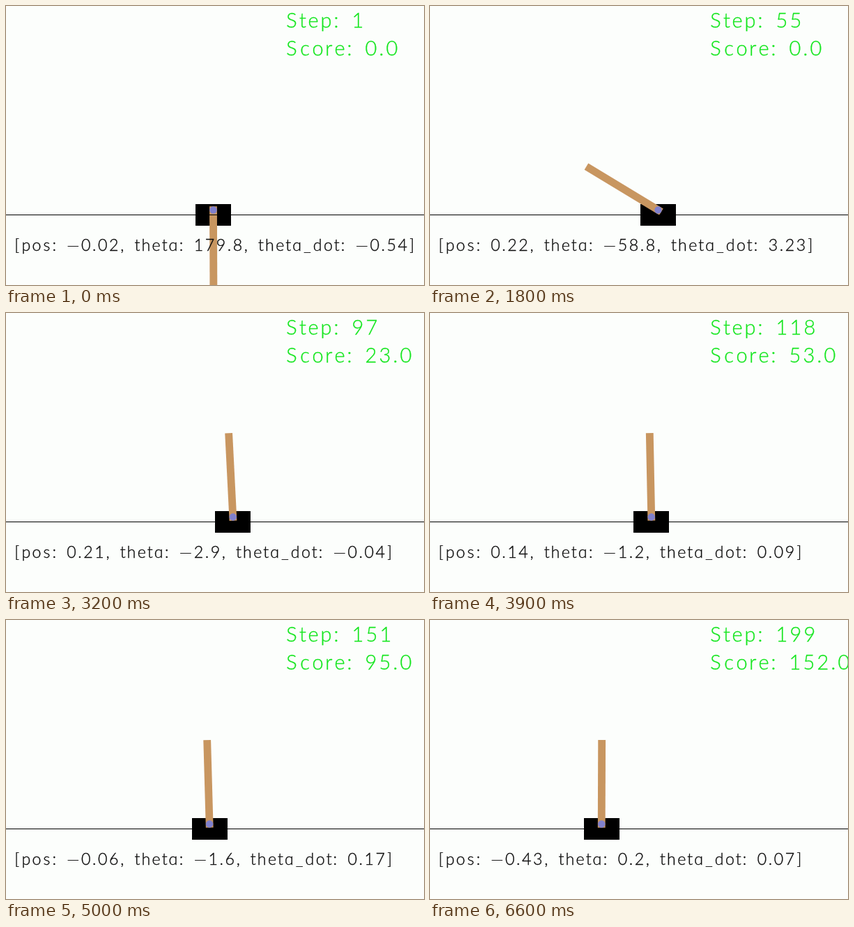
An HTML page with a canvas for the animation above (6700 ms loop, 600 by 400 pixels).

```html
<!DOCTYPE html>
<html lang="en">
<head>
<meta charset="utf-8">
<title>Cart pole swing-up</title>
<style>
  html, body { margin: 0; width: 100%; height: 100%; overflow: hidden; background: #fcfefc; }
  canvas { display: block; }
</style>
</head>
<body>
<canvas id="stage" width="600" height="400"></canvas>
<script>
const ctx = document.getElementById('stage').getContext('2d');
const FRAME_MS = 100, FRAMES = 67, STEPS_PER_FRAME = 3;
const RAD = Math.PI / 180, FRAME_SECONDS = 0.06;
const PX_PER_UNIT = 125, AXLE_Y = 292.5;
const GREEN = '#14e61e', INK = '#0c0c0c';

// Key states of the swing-up: frame, cart position, pole degrees, pole rad/s
const KEYS = [
  [0, -0.02, 179.8, -0.54],
  [4, -0.35, 157, -2.3],
  [7, -0.7, 137, -0.3],
  [9, -0.75, 144.8, 2.89],
  [14, -0.18, 234, 5.8],
  [18, 0.22, 301.2, 3.23],
  [23, 0.27, 338, 1.3],
  [32, 0.206, 357.1, -0.04],
  [45, 0.06, 358.1, -0.23],
  [56, -0.23, 360.9, -0.06],
  [66, -0.43, 360.2, 0.07]
].map(([frame, pos, deg, spin]) => ({ frame, pos, deg, turn: spin * FRAME_SECONDS / RAD }));

// Cart speed at each key follows from its neighbours
KEYS.forEach((k, i) => {
  const a = KEYS[i - 1] || k, b = KEYS[i + 1] || k;
  k.speed = (b.pos - a.pos) / (b.frame - a.frame);
});

// Cubic Hermite curve through a value and its slope
function curve(a, b, value, slope, frame) {
  const h = b.frame - a.frame, u = (frame - a.frame) / h;
  const d = b[value] - a[value], m = a[slope] * h, n = b[slope] * h;
  const c2 = 3 * d - 2 * m - n, c3 = m + n - 2 * d;
  return {
    value: a[value] + u * (m + u * (c2 + u * c3)),
    slope: (m + u * (2 * c2 + u * 3 * c3)) / h
  };
}

// One point per step once upright, ten on a bonus step
const UPRIGHT_STEP = 74, BONUS_STEPS = [117, 148, 159];
function scoreAt(step) {
  const bonuses = BONUS_STEPS.filter(s => step >= s).length;
  return Math.max(0, step - UPRIGHT_STEP) + 9 * bonuses;
}

// Character advances, relative to a capital height of 21
const ADVANCE = {};
const setAdvance = (chars, w) => { for (const c of chars) ADVANCE[c] = w; };
setAdvance('0123456789S', 20);
setAdvance('poahd', 19);
setAdvance('ec_', 18);
setAdvance('s', 17);
setAdvance(' ', 16);
setAdvance('[]', 14);
setAdvance('r', 13);
setAdvance('t', 12);
setAdvance(':.,', 10);
setAdvance('-', 26);
const GLYPH = { 'a': '\u0251', '-': '\u2014' };

function drawText(text, x, y, scale, color) {
  ctx.font = `300 ${29 * scale}px Lato, "Open Sans", sans-serif`;
  ctx.textAlign = 'center';
  ctx.fillStyle = ctx.strokeStyle = color;
  ctx.lineWidth = 0.35;
  for (const c of text) {
    const w = ADVANCE[c] * scale, glyph = GLYPH[c] || c;
    ctx.fillText(glyph, x + w / 2, y);
    ctx.strokeText(glyph, x + w / 2, y);
    x += w;
  }
}

function drawPole(x, degrees) {
  ctx.save();
  ctx.translate(x, AXLE_Y);
  ctx.rotate(degrees * RAD);
  ctx.fillStyle = '#c89660';
  ctx.fillRect(-5.4, -120.5, 10.8, 125.7);
  ctx.fillStyle = '#8080cc';
  ctx.beginPath();
  ctx.arc(0, 0, 5.2, 0, 2 * Math.PI);
  ctx.fill();
  ctx.restore();
}

function draw(frame) {
  const next = Math.max(1, KEYS.findIndex(k => k.frame >= frame));
  const a = KEYS[next - 1], b = KEYS[next];
  const pos = curve(a, b, 'pos', 'speed', frame).value;
  const pole = curve(a, b, 'deg', 'turn', frame);
  const theta = (pole.value + 180) % 360 - 180;
  const thetaDot = pole.slope * RAD / FRAME_SECONDS;
  const step = 1 + frame * STEPS_PER_FRAME;
  const x = 300 + pos * PX_PER_UNIT;

  ctx.fillStyle = '#fcfefc';
  ctx.fillRect(0, 0, 600, 400);
  ctx.fillStyle = '#000';
  ctx.fillRect(Math.round(x - 25.5), 284, 51, 31);
  drawPole(x, theta);
  ctx.fillStyle = '#000';
  ctx.fillRect(0, 299, 600, 1);

  drawText(`Step: ${step}`, 400, 31, 1, GREEN);
  drawText(`Score: ${scoreAt(step).toFixed(1)}`, 400, 71, 1, GREEN);
  drawText(`[pos: ${pos.toFixed(2)}, theta: ${theta.toFixed(1)}, theta_dot: ${thetaDot.toFixed(2)}]`,
    10, 351, 0.8, INK);
}

const start = performance.now();
function tick() {
  const elapsed = performance.now() - start;
  draw(Math.floor(elapsed / FRAME_MS) % FRAMES);
  requestAnimationFrame(tick);
}
tick();
</script>
</body>
</html>
```
